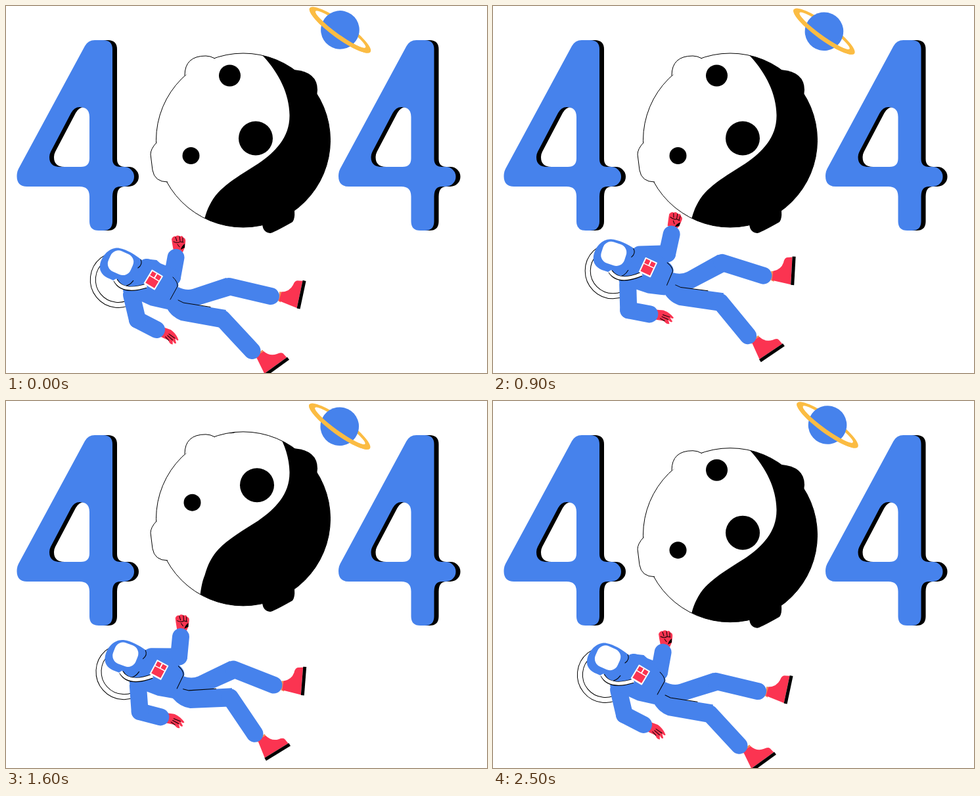
Recreate the animation shown at these times as an HTML page. Size 732 by 559 pixels, loop 2600 ms.

```html
<!DOCTYPE html>
<html lang="en">
<head>
<meta charset="utf-8">
<title>404</title>
<style>
  html, body { margin: 0; width: 100%; height: 100%; overflow: hidden; background: #fff; }
  svg { display: block; }
  .blue { fill: #4682ec; }
  .red { fill: #fb3451; }
  .ring { fill: #fbbc43; }
  .limb { fill: none; stroke: #4682ec; stroke-width: 26; stroke-linejoin: round; stroke-linecap: round; }
  .line { fill: none; stroke: #000; stroke-width: 1; stroke-linecap: round; }
  .outline { fill: #fff; stroke: #000; stroke-width: 1; }
  .tube { fill: none; stroke: #000; }
  .tube.in { stroke: #fff; }
</style>
</head>
<body>
<svg width="732" height="559" viewBox="0 0 732 559">
  <defs>
    <path id="digit" fill-rule="evenodd" d="M135 52H148Q162 52 162 66V233Q162 245 174 245H180A15 15 0 0 1 180 275H174Q162 275 162 290V328Q162 342 148 342H141Q127 342 127 328V290Q127 275 112 275H32Q16.500 275 16.500 259Q16.500 253 19 248L120 61Q125 52 135 52Z
      M112 154Q127 154 127 169V232Q127 245 114 245H82Q66 245 66 230Q66 226 68 222L99 163Q104 154 112 154Z"/>
    <g id="four">
      <use href="#digit" x="7"/>
      <use href="#digit" class="blue"/>
    </g>
    <g id="boot">
      <path fill="#f58a55" d="M-34 2L-29 2L-29 18L-34 16Z"/>
      <path class="red" d="M-31 2Q-19 -1 -16 -12Q-15 -19 -11 -20L-3 -21V21L-32 16Z"/>
      <path d="M-3 -22H2V21.500H-3Z"/>
    </g>
    <clipPath id="disc"><circle cx="361" cy="204.500" r="132.500"/></clipPath>
  </defs>

  <use href="#four"/>
  <use href="#four" x="489.500"/>

  <g id="planet">
    <path class="ring" fill-rule="evenodd" d="M-57 0A57 13 0 0 0 57 0A57 13 0 0 0 -57 0ZM-47 -1A47 7.500 0 0 0 47 -1A47 7.500 0 0 0 -47 -1Z"/>
    <circle class="blue" r="29.300"/>
    <path class="ring" d="M-57 0A57 13 0 0 0 57 0L47 -1A47 7.500 0 0 1 -47 -1Z"/>
  </g>

  <g id="moon">
    <circle class="outline" cx="361" cy="204.500" r="132.500"/>
    <path class="outline" d="M272 106Q272 76 304 76Q311 76 318 80"/>
    <path class="outline" d="M229 208Q220 218 220 226L223 250Q226 268 246 268"/>
    <path d="M438 97Q474 100 474 128L473 137L440 130Z"/>
    <path d="M390 332Q391 345 402 346Q406 346 436 329Q440 324 439 312L400 310Z"/>
    <g clip-path="url(#disc)">
      <path id="shade" d="M370 50L391 76C416 103 431 134 431.500 166C432 200 410 222 384 240C362 254 338 268 323 284C312 296 306 310 302.500 323Q296 338 294 370V440H560V30Z"/>
      <g id="craters">
        <circle cx="340.500" cy="106" r="16.500"/>
        <circle cx="281.500" cy="228" r="13"/>
        <circle cx="380" cy="201.500" r="26"/>
      </g>
    </g>
  </g>

  <!-- Drawn in the lowest pose; each bone turns about its pivot by lift and drift degrees -->
  <g id="body">
    <g class="bone" data-pivot="224 417.500" data-turn="-6 -0.700">
      <g transform="translate(224 417.500) rotate(6) translate(-236 -398)">
        <circle class="tube" cx="183" cy="403" r="38.500" stroke-width="9"/>
        <circle class="tube in" cx="183" cy="403" r="38.500" stroke-width="7"/>
      </g>

      <g class="bone" data-pivot="272 445" data-turn="-5 -2.300">
        <path class="blue" d="M252 444L262 428Q274 434 284 431L335 414L345 440L286 458L262 456Z"/>
        <g class="bone" data-pivot="339 427" data-turn="15.500 9.500">
          <g class="bone" data-pivot="412 443" data-turn="-13.500 -10.500">
            <use href="#boot" transform="translate(450 440) rotate(12)"/>
          </g>
          <path class="limb" d="M339 427L403 442"/>
        </g>
      </g>

      <g class="bone" data-pivot="191 440" data-turn="18 5.200">
        <g class="bone" data-pivot="200 478" data-turn="-29 -10.500">
          <g transform="translate(229 493) rotate(25)">
            <path class="red" d="M8 -8L20 -9Q30 -7 37 0Q36 3 31 0L36 6Q34 9 29 4L32 10Q28 12 23 7L9 7Z"/>
            <path class="line" d="M20 -2L31 0M19 1L29 4M17 4L24 7"/>
          </g>
          <path class="limb" d="M200 478L229 493"/>
        </g>
        <path class="limb" d="M191 440L200 478"/>
      </g>

      <g class="bone" data-pivot="208 398" data-turn="-17 -11">
        <g class="bone" data-pivot="253 413" data-turn="25 6">
          <g class="bone" data-pivot="263 361" data-turn="16 0">
            <g transform="translate(263 361)">
              <path class="red" d="M-8 12L-10 1L-11 -6Q-9 -11 -5 -10Q-2 -13 2 -10Q6 -12 7 -8Q11 -7 10 -1L9 7L6 14Z"/>
              <path class="line" d="M-5 -9L-3 -3M1 -10L2 -3M6 -8L6 -2M-8 -2Q-2 1 2 -2L7 -1M-2 2L1 6"/>
              <path d="M9 1L9 7L3 10Q4 5 9 1Z"/>
            </g>
          </g>
          <path class="limb" d="M253 413L258.500 383"/>
        </g>
        <path class="limb" d="M214 398L253 413"/>
      </g>

      <g transform="translate(224 417.500) rotate(6) translate(-236 -398)">
        <path class="blue" d="M213 371L222 367L238 367L256 380L270 392Q275 397 275 403Q273 415 262 440L236 437L212 429L192 420Q192 414 197 408Z"/>
        <path class="blue" d="M153 384C154 366 168 354 180 355C192 356 204 362 215 369Q217 385 206 397Q203 406 194 411L170 403Q153 398 153 384Z"/>
        <rect x="-18.500" y="-17" width="37" height="34" rx="13" fill="#fff" transform="translate(184 377) rotate(18)"/>
        <path class="line" d="M214 369Q218 376 211 382M206 402Q200 412 190 412"/>
        <path class="tube" stroke-width="7" d="M179 404Q191 423 226 408"/>
        <path class="tube in" stroke-width="5" d="M178 403Q191 423 227 407.500"/>
        <g transform="translate(236 398) rotate(25)">
          <rect x="-10" y="-13" width="20" height="25" rx="1" fill="#fff"/>
          <path class="red" d="M-8 -11h7v7h-7zM1 -11h7v7h-7zM-8 -2.500h16v12h-16z"/>
        </g>
      </g>

      <g class="bone" data-pivot="262 464" data-turn="4 -11.300">
        <path class="blue" d="M242 455Q250 473 266 479L324 489.500L335 463L270 452L262 440L251 444Z"/>
        <g class="bone" data-pivot="329 476" data-turn="5.500 19.500">
          <g class="bone" data-pivot="384 534" data-turn="-1.500 -4">
            <use href="#boot" transform="translate(412 550) rotate(54)"/>
          </g>
          <path class="limb" d="M329 476L374.500 525"/>
        </g>
        <path class="line" d="M262 448L270 452L311 458.500"/>
      </g>
      <path class="line" d="M254 413Q262 421 261 427L250 447"/>
    </g>
  </g>
</svg>
<script>
const LOOP = 2600, STEP = 100;
const $ = id => document.getElementById(id);
const move = (id, x, y, turn = 0) =>
  $(id).setAttribute('transform', `translate(${x} ${y}) rotate(${turn})`);

const bones = [...document.querySelectorAll('.bone')].map(el => ({
  el, pivot: el.dataset.pivot, turn: el.dataset.turn.split(' ').map(Number)
}));

function ramp(t, from, to) {
  const p = Math.min(1, Math.max(0, (t - from) / (to - from)));
  return (1 - Math.cos(Math.PI * p)) / 2;
}

// Eases from 0 to 1 between a and b, and back between c and d
const swell = (t, a, b, c, d) => ramp(t, a, b) - ramp(t, c, d);

function draw(t) {
  const rise = 25.3 * swell(t, 900, 1640, 1690, 2560);
  move('moon', 0, -rise);
  move('shade', 0, -rise * 1.3);
  move('craters', rise * 0.08, -rise * 1.92);

  const orbit = 2 * Math.PI * (t - 2150) / LOOP;
  move('planet', 507 + 3.1 * Math.cos(orbit), 36.4 + 2.3 * swell(t, 0, 600, 2100, 2550), 36);

  const lift = swell(t, 0, 1000, 1000, 2050);
  const drift = swell(t, 1000, 1600, 2050, 2550);
  move('body', 12 * lift + 4 * drift, -19.5 * lift);
  for (const { el, pivot, turn } of bones)
    el.setAttribute('transform', `rotate(${turn[0] * lift + turn[1] * drift} ${pivot})`);
}

const start = performance.now();
function tick() {
  const t = (performance.now() - start) % LOOP;
  draw(Math.floor(t / STEP) * STEP);
  requestAnimationFrame(tick);
}
tick();
</script>
</body>
</html>
```
